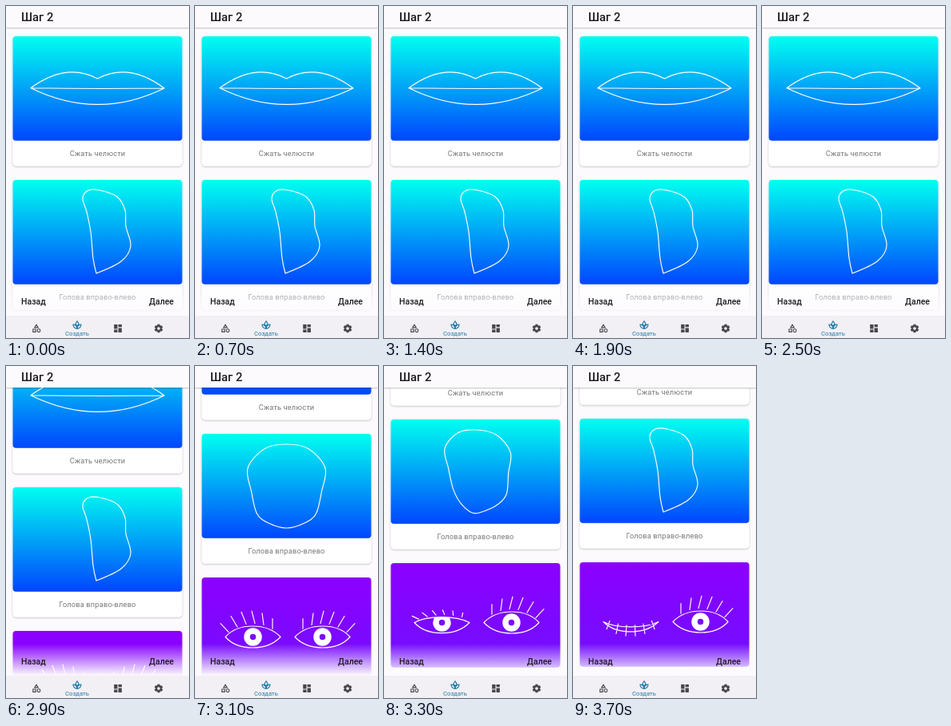
An HTML page for the animation above (3800 ms loop, 229 px wide and 416 px high).

```html
<!DOCTYPE html>
<html lang="ru">
<head>
<meta charset="utf-8">
<title>Шаг 2</title>
<style>
  html, body { margin: 0; width: 100%; height: 100%; overflow: hidden; background: #fcfafd; }
  svg { display: block; width: 100%; height: 100%; font-family: Roboto, "Noto Sans", sans-serif; }
  .line { fill: none; stroke: #fff; stroke-width: 1.15; stroke-linejoin: round; stroke-linecap: round; }
  .iris { fill: none; stroke: #fff; stroke-width: 7.5; }
  .label { font-size: 9.3px; letter-spacing: .15px; fill: #77767a; text-anchor: middle; }
  .button { font-size: 10.5px; font-weight: 500; fill: #1d1b20; }
  .title { font-size: 14.8px; font-weight: 500; fill: #1d1b20; }
</style>
</head>
<body>
<svg viewBox="0 0 229 416">
  <defs>
    <linearGradient id="sea" x2="0" y2="1">
      <stop stop-color="#00fff0"/><stop offset="1" stop-color="#0046ff"/>
    </linearGradient>
    <linearGradient id="violet" x2="0" y2="1">
      <stop stop-color="#8c00ff"/><stop offset="1" stop-color="#7010ff"/>
    </linearGradient>
    <linearGradient id="fade" x2="0" y2="1">
      <stop stop-color="#fcfafd" stop-opacity="0"/><stop offset="1" stop-color="#fcfafd"/>
    </linearGradient>
    <filter id="shadow" x="-5%" y="-5%" width="110%" height="112%">
      <feDropShadow dx="0" dy=".8" stdDeviation=".8" flood-opacity=".28"/>
    </filter>
    <clipPath id="view"><rect y="27" width="229" height="361"/></clipPath>
    <clipPath id="lidClip"><path id="lidShape"/></clipPath>
    <g id="card">
      <rect x="8.5" width="212" height="162.5" rx="4.5" fill="#fff" filter="url(#shadow)"/>
      <rect x="8.5" width="212" height="130.7" rx="4"/>
    </g>
  </defs>

  <rect width="229" height="416" fill="#fcfafd"/>
  <g clip-path="url(#view)">
    <g id="list">
      <g transform="translate(0 38)">
        <use href="#card" fill="url(#sea)"/>
        <path class="line" d="M31 64.8Q75 32 114.500 53Q154 32 198 65Q115 106 31 64.800Q114 66 198 65"/>
        <text class="label" x="114.5" y="150">Сжать челюсти</text>
      </g>
      <g transform="translate(0 218)">
        <use href="#card" fill="url(#sea)"/>
        <path id="head" class="line"/>
        <text class="label" x="114.5" y="150">Голова вправо-влево</text>
      </g>
      <g transform="translate(0 398)">
        <use href="#card" fill="url(#violet)"/>
        <circle class="iris" cx="72.5" cy="74.5" r="7.5" clip-path="url(#lidClip)"/>
        <path id="winking" class="line"/>
        <g transform="matrix(-1 0 0 1 232 0)">
          <circle class="iris" cx="72.5" cy="74.5" r="7.5"/>
          <path id="open" class="line"/>
        </g>
      </g>
    </g>
  </g>

  <rect y="348" width="229" height="40" fill="url(#fade)"/>
  <text class="button" x="19" y="373.8">Назад</text>
  <text class="button" x="210" y="373.8" text-anchor="end">Далее</text>

  <rect width="229" height="27" fill="#fcfafd" filter="url(#shadow)"/>
  <text class="title" x="19" y="18.5">Шаг 2</text>

  <rect y="388" width="229" height="28" fill="#f2f0f4"/>
  <g fill="none" stroke="#46464c" stroke-width="1.1">
    <path d="M38 399.2l2.3 3.7h-4.6zM33.8 405h3.4v3.4h-3.4z"/>
    <circle cx="41" cy="406.7" r="1.9"/>
  </g>
  <path fill="#46464c" d="M135.2 399h4.3v5.500h-4.3zM140.6 399h4.3v3.3h-4.3zM135.2 405.6h4.3v3.3h-4.3zM140.6 403.4h4.3v5.500h-4.3z"/>
  <g id="gear" transform="translate(191 404)" fill="#46464c">
    <circle r="2.9" fill="none" stroke="#46464c" stroke-width="2.2"/>
  </g>
  <path fill="none" stroke="#227aa5" stroke-width="1.2" stroke-linejoin="round"
    d="M89 404.3Q84 403.500 84 399Q88.500 399.500 89 404.3Q89.500 399.500 94 399Q94 403.500 89 404.3M86.800 398.500L89 394.800L91.200 398.500L89 400.800z"/>
  <text x="89" y="412.6" font-size="7.7" fill="#227aa5" text-anchor="middle">Создать</text>
</svg>
<script>
const LOOP = 3800, STEP = 100;
const $ = id => document.getElementById(id);
const mix = (a, b, k) => a + (b - a) * k;
const mixPoint = (a, b, k) => a.map((v, i) => mix(v, b[i], k));

// Progress 0..1 between two times, slowing down for powers above 1
const ease = (t, from, to, power = 1) =>
  1 - (1 - Math.min(1, Math.max(0, (t - from) / (to - from)))) ** power;

// Outline points, clockwise from the top of the head
const half = [[0, 13], [28, 19], [48.5, 43], [44, 72], [37, 100], [22, 112], [0, 118]];
const front = [...half, ...half.slice(1, -1).reverse().map(([x, y]) => [-x, y])]
  .map(([x, y]) => [114.5 + x, y]);
const side = [[118, 13], [139, 21], [149, 38], [150, 58], [156, 83], [144, 102],
  [113, 117], [109, 98], [106, 65], [101, 40], [96, 23], [103, 13]];
const CHIN = 6;

// Closed spline through the points; the chin is a sharp corner in side view
function headPath(k) {
  const points = side.map((p, i) => mixPoint(p, front[i], k));
  const at = i => points[(i + points.length) % points.length];
  const handle = (i, sign) => {
    const pull = (i === CHIN ? k : 1) * sign / 6;
    return at(i).map((v, axis) => v + (at(i + 1)[axis] - at(i - 1)[axis]) * pull);
  };
  return `M${at(0)}` + points.map((_, i) =>
    `C${handle(i, 1)} ${handle(i + 1, -1)} ${at(i + 1)}`).join('');
}

const lidPath = k => {
  const top = mix(56.5, 83, k), bottom = mix(92.5, 91, k);
  return `M38 74.5C54 ${top} 90 ${top} 107 74.5C90 ${bottom} 54 ${bottom} 38 74.5`;
};

// Six lashes whose roots and tips lie on parabolas
function lashPath(k) {
  let path = '';
  for (let i = 0; i < 6; i++) {
    const up = (i - 2.8) ** 2, down = (i - 2.5) ** 2;
    const root = mixPoint([42 + 11 * i, 57.5 + 1.4 * up], [46 + 10.5 * i, 79 - .9 * down], k);
    const tip = mixPoint([32 + 13 * i, 42 + 2 * up], [42 + 12 * i, 92.5 - 1.4 * down], k);
    path += `M${root}L${tip}`;
  }
  return path;
}

for (let a = 0; a < 360; a += 60) {
  const tooth = document.createElementNS($('gear').namespaceURI, 'path');
  tooth.setAttribute('d', 'M-1.4-5.3h2.8l.5 2h-3.8z');
  tooth.setAttribute('transform', `rotate(${a})`);
  $('gear').append(tooth);
}
$('open').setAttribute('d', lidPath(0) + lashPath(0));

function draw(ms) {
  const t = Math.floor(ms % LOOP / STEP) * STEP;
  const scroll = 66 * ease(t, 2500, 2900, 1.3) + 86 * ease(t, 2900, 3400, 3);
  const turn = ease(t, 2900, 3100) - ease(t, 3200, 3500);
  const wink = ease(t, 3200, 3500);

  $('list').setAttribute('transform', `translate(0 ${-Math.round(scroll)})`);
  $('head').setAttribute('d', headPath(turn));
  $('winking').setAttribute('d', lidPath(wink) + lashPath(wink));
  $('lidShape').setAttribute('d', wink < 1 ? lidPath(wink) : '');
}

let start;
function tick(now) {
  start ??= now;
  draw(now - start);
  requestAnimationFrame(tick);
}
draw(0);
requestAnimationFrame(tick);
</script>
</body>
</html>
```
